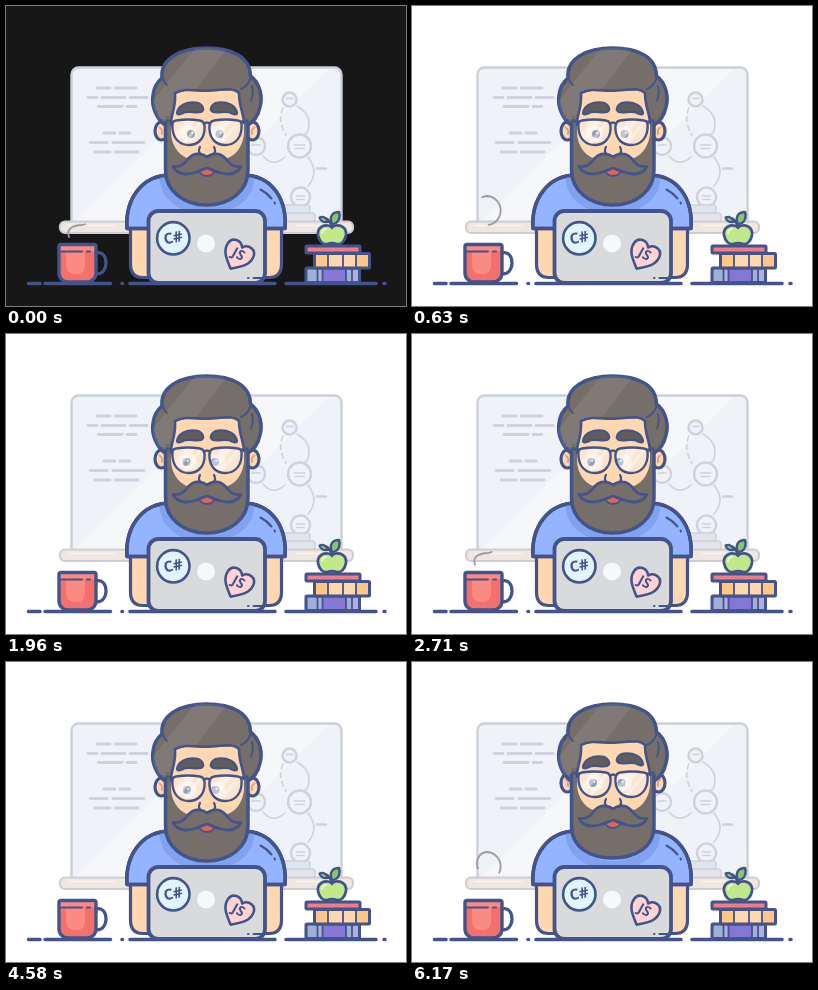
Animation, 400 px wide and 300 px high, one loop 6.21 s. Source, as an HTML page with a canvas:

```html
<!DOCTYPE html>
<html lang="en">
<head>
<meta charset="utf-8">
<title>Developer at the desk</title>
<style>
html, body { margin: 0; width: 100%; height: 100%; overflow: hidden; background: #fff; }
canvas { display: block; width: 400px; height: 300px; }
</style>
</head>
<body>
<canvas id="stage" width="400" height="300"></canvas>
<script>
const ctx = document.getElementById('stage').getContext('2d');
const LOOP = 6210, STEAM = 2700;
const INK = '#43548a', HAIR = '#756e69', SKIN = '#ffd8b1', PALE = '#cdd2dc';

function shape(path, fill, stroke = INK, width = 3.5) {
  const p = typeof path === 'string' ? new Path2D(path) : path;
  if (fill) { ctx.fillStyle = fill; ctx.fill(p); }
  if (stroke) { ctx.strokeStyle = stroke; ctx.lineWidth = width; ctx.stroke(p); }
}
function line(d, color = INK, width = 2.5) { shape(d, null, color, width); }
function box(x, y, w, h, r) {
  const p = new Path2D();
  p.roundRect(x, y, w, h, r);
  return p;
}
function oval(x, y, rx, ry = rx) {
  const p = new Path2D();
  p.ellipse(x, y, rx, ry, 0, 0, 7);
  return p;
}
function clipped(path, draw) {
  ctx.save();
  ctx.clip(typeof path === 'string' ? new Path2D(path) : path);
  draw();
  ctx.restore();
}
function moved(x, y, draw, turn = 0) {
  ctx.save();
  ctx.translate(x, y);
  ctx.rotate(turn);
  draw();
  ctx.restore();
}
function mirrored(axis, draw) {
  draw();
  ctx.save();
  ctx.translate(axis * 2, 0);
  ctx.scale(-1, 1);
  draw();
  ctx.restore();
}
function dashed(pattern, offset, draw) {
  ctx.save();
  ctx.setLineDash(pattern);
  ctx.lineDashOffset = offset;
  draw();
  ctx.restore();
}
function label(text, size) {
  ctx.font = `bold ${size}px "Open Sans", "Noto Sans", sans-serif`;
  ctx.textAlign = 'center';
  ctx.textBaseline = 'middle';
  ctx.fillStyle = INK;
  ctx.fillText(text, 0, 0.5);
}
// Value at t from rows of [time, value, ...]
function track(rows, t, col = 1) {
  let i = 1;
  while (i < rows.length - 1 && rows[i][0] < t) i++;
  const a = rows[i - 1], b = rows[i];
  const k = Math.min(1, Math.max(0, (t - a[0]) / (b[0] - a[0])));
  return a[col] + (b[col] - a[col]) * k;
}

function board() {
  const frame = box(65.5, 61.5, 270, 160, 7);
  shape(frame, '#eff2f6', null);
  clipped(frame, () => shape('M224 61H324L164 221H64Z', '#f5f7f9', null));
  shape(frame, null, '#cbd0da', 2.4);
  line('M91 82H104M109 82H130M82 91.5H91M96 91.5H119M124 91.5H141M92 100.5H116M121 100.5H130' +
    'M98 127H109M114 127H124M84 136.5H101M107 136.5H138M89 146H104M109 146H132', PALE, 2.8);

  dashed([5, 4], 0, () => line('M277 102Q271 114 280 129', PALE, 1.6));
  line('M291 100Q303 107 303 117T299 128', PALE, 1.6);
  line('M257 150Q267 162 279 151M302 151Q314 166 302 180', PALE, 1.6);
  line('M311 162.5H320', PALE, 2.5);
  for (const [x, y, r] of [[283.5, 93.5, 7], [293.5, 140, 11.5], [250, 140, 9], [294.5, 191, 9.5]]) {
    shape(oval(x, y, r), '#eff2f6', PALE, 2.4);
    line(`M${x - r * .45} ${y - 1}h${r * .9}`, PALE, 1.6);
    if (r > 9) line(`M${x - r * .4} ${y + 2.5}h${r * .8}`, PALE, 1.3);
  }
  shape(box(276, 199, 28, 8, 3), '#e1e4ea', PALE, 1.5);
  shape(box(274, 207, 35, 9, 3), '#e1e4ea', PALE, 1.5);
  shape(box(54, 215.5, 293, 11.5, 5), '#eee6e1', '#cfcdd3', 2.2);
  line('M62 219.5H110M290 219.5H331M336 219.5H339', '#f8f3ef', 1.6);
}

function steam(t) {
  const phase = (t + 250) % STEAM;
  const rows = [[0, 0, 8], [60, 0, 13], [255, 0, 25], [880, 22, 69],
    [1020, 36, 86], [1540, 84, 123], [2130, 117, 123], [2250, 123, 123]];
  const tail = track(rows, phase), head = track(rows, phase, 2);
  if (head - tail < .3) return;
  dashed([head - tail, 400], -tail, () =>
    line('M63 231C60 223 66 219.5 76 219A14.6 14.6 0 0 0 75.5 190' +
      'C69 190 65 195 65 202C65 208 69 211 73 211C79 211 83 206 81 202Q79 199 75 199.5', '#999ca6', 1.8));
}

function body() {
  mirrored(200, () => {
    shape('M124.5 218V258Q124.5 272 137 272H152V218Z', SKIN, null);
    line('M124.5 222V258Q124.5 271.5 137 271.5H148', INK, 3.2);
  });
  const shirt = 'M121 222.5C119 194 135 169 165 169H236C267 169 281 194 279 222.5Z';
  shape(shirt, '#94b4ff');
  clipped(shirt, () => shape('M158 172C160 214 242 214 244 172', null, '#82a2ef', 9));
  shape(shirt, null);
  line('M254.5 183.5Q261 187 265.5 192.5M268.5 196.5L269 197.5', INK, 2);
}

function head(up) {
  const dy = -4 * up, low = 199 - 3 * up;
  moved(0, dy, () => mirrored(201, () => {
    shape(oval(155.5, 125, 6.5, 9), SKIN, INK, 3.2);
    line('M153.5 121.5Q157 123 156 128', '#dd9e83', 1.8);
  }));

  const hair = 'M159 119C151 113 145 101 147 89C148 81 151 76 156 72' +
    'C154 52 176 42 200 42C227 42 244 51 244.5 70C254 77 257 91 254 101C252 110 249 115 242 119Z';
  shape(hair, HAIR, INK, 3.5);
  clipped(hair, () => shape('M190 41H222L168 113H132Z', 'rgba(255,255,255,.08)', null));

  const jaw = `V164C159.5 185 178 ${low} 200.5 ${low}C224 ${low} 242 185 242 164V`;
  const beard = `M159.5 ${110 + dy}${jaw}${110 + dy}Z`;
  shape(beard, HAIR, null);
  line(`M159.5 ${117 + dy}${jaw}${117 + dy}`, INK, 3.5);

  moved(0, dy, () => {
    const brow = 'V117C165 108 170 102 169 87C181 81 191 86 205 84.5C219 84 227 81 233 87C233 101 238 108 238 117';
    shape(`M165 126${brow}V126C238 138 230 152 217 153H186C173 152 165 138 165 126Z`, SKIN, null);
    line(`M165 119${brow}`, INK, 2.6);
  });
  line('M235 83Q242 80 244 73M246 80Q248 88 245 94M157 73Q158 77 161 79', INK, 2);
}

function eyebrow(lift) {
  moved(0, -lift, () =>
    shape('M171 107C172 99 181 95.5 190 96.5C197 97.5 199 104 195 106C189 107.5 181 104 176 107.5Q171 109.5 171 107Z',
      '#625d5d', INK, 2.2));
}

function glasses(eyeY, look) {
  const lens = 'M170 114.5Q182 112.5 194 114.5C198 115 199 118.5 198.5 124C197.5 134 191 139 183 139' +
    'C174 139 167.5 133 166.5 123C166 117 166.5 115 170 114.5Z';
  for (const right of [0, 1]) {
    const x = look + right * 28.5;
    moved(right * 37, 0, () => clipped(lens, () => shape(lens, 'rgba(246,240,236,.55)', null)));
    shape(oval(182.5 + right * 29, eyeY, 8.5), 'rgba(255,255,255,.45)', null);
    shape(oval(x, eyeY, 4), '#94a0bb', null);
    shape(oval(x + 1.2, eyeY - 1.2, 1.2), '#dfe4ee', null);
    moved(right * 37, 0, () => clipped(lens, () =>
      shape('M181 112H191L170 139H160ZM196 112H200L179 139H175Z', 'rgba(255,255,255,.38)', null)));
  }
  mirrored(201, () => {
    line(lens, INK, 2.4);
    line('M167 116L161 114.5', INK, 2.6);
  });
  line('M198 118Q201 115 204 118', INK, 2.4);
}

function face(up, look) {
  moved(0, -4 * up, () => {
    eyebrow(-2 * up);
    moved(402, 0, () => {
      ctx.scale(-1, 1);
      eyebrow(up);
    });
    line('M194 141Q191 146 196 149.5M208 141Q211 146 206 149.5', INK, 2.2);
    glasses(128 - 3 * up, look);

    shape('M192 161Q193 170 201 170T210 161Z', '#e0645b', INK, 2);
    shape('M201 151C195 146 187 147 182 153C178 159 173 161.5 167 160.5C171 168 179 169 187 167C193 165.5 198 163 201 162' +
      'C204 163 209 165.5 215 167C223 169 231 168 235 160.5C229 161.5 224 159 220 153C215 147 207 146 201 151Z',
      HAIR, INK, 2.8);
  });
}

function laptop() {
  const lid = box(142.5, 205, 116.5, 72, 10);
  shape(lid, '#d9dadc', INK, 3.8);
  shape(oval(200, 237.5, 9), '#f7f8fa', null);
  shape(oval(167.3, 232.3, 16.2), '#e2f5ff', INK, 2.6);
  moved(167.3, 232.3, () => label('C#', 15), -.2);
  moved(232, 249, () => {
    shape('M0 15.5C-8 9 -15 4 -14.5 -5C-14 -13.5 -4 -15 0 -8.5C4 -15 14 -13.5 14.5 -5C15 4 8 9 0 15.5Z',
      '#ffd3d4', INK, 2.6);
    moved(0, -.5, () => label('JS', 14));
  }, .5);
}

function mug() {
  line('M90 247C103.5 243 103.5 271 89 267.5', INK, 3.2);
  const cup = box(53, 238.5, 37, 37.5, [2, 2, 9, 9]);
  shape(cup, '#f4706d', null);
  clipped(cup, () => {
    shape('M53 238H90V245H53Z', '#fb8a85', null);
    shape(box(60, 246, 19, 22, [0, 0, 8, 8]), '#fb8a85', null);
  });
  shape(cup, null, INK, 3.4);
  line('M55 245.5H76M81 245.5H84', INK, 1.8);
}

function books() {
  const low = box(300, 262, 53.5, 14.5, 1);
  shape(low, '#b3abe6', null);
  shape('M300 262H311V276H300ZM340 262H346V276H340Z', '#9fb0d6', null);
  shape('M317 262H340V276H317Z', '#8577d6', null);
  shape(low, null, INK, 3);
  line('M311.5 263V276M316.5 263V276M340 263V276M346 263V276', INK, 1.8);
  shape(box(308.5, 247.5, 55, 14.5, 1), '#ffc785', null);
  shape('M322 248H350V261H322Z', '#ffd7ae', null);
  shape(box(308.5, 247.5, 55, 14.5, 1), null, INK, 3);
  line('M322 248V261M337 248V261M350 248V261', INK, 1.8);
  shape(box(300, 240, 54, 7, 1), '#ee7f88', INK, 3);

  const fruit = 'M326 221C319 217 311 221 312 229C313 235 317 239 321 238Q326 236.5 331 238' +
    'C335 239 339 235 340 229C341 221 333 217 326 221Z';
  shape(fruit, '#c1e98a', INK, 2.8);
  line('M316 227Q317 223 320 223', '#e3f8c4', 2.2);
  line('M326 222Q325 215 320 212.5', INK, 2.6);
  shape('M326 218C323 211 326 206 333 206C335 212 332 218 326 218Z', '#86ca68', INK, 2.4);
  shape('M322 216Q315 217 313.5 211.5Q319 209 322 216Z', '#86ca68', INK, 2.2);
}

function render(t) {
  ctx.fillStyle = t < 40 ? '#171717' : '#fff';
  ctx.fillRect(0, 0, 400, 300);
  ctx.lineCap = ctx.lineJoin = 'round';
  const k = Math.min(1, Math.max(0, (t - 4580) / 600));
  const up = k * k * (3 - 2 * k);
  const look = track([[0, 185], [630, 184], [1290, 182], [2710, 179], [4580, 181], [6210, 181]], t);
  board();
  steam(t);
  body();
  head(up);
  face(up, look);
  line('M22.5 277.5H34M39 277.5H104.5M116 277.5H116.5M124 277.5H269M280 277.5H370M378 277.5H379', INK, 3.6);
  laptop();
  line('M242 272H242.5M247.5 272H264', INK, 2);
  mug();
  books();
}

const start = performance.now();
function tick() {
  render((performance.now() - start) % LOOP);
  requestAnimationFrame(tick);
}
tick();
</script>
</body>
</html>
```
